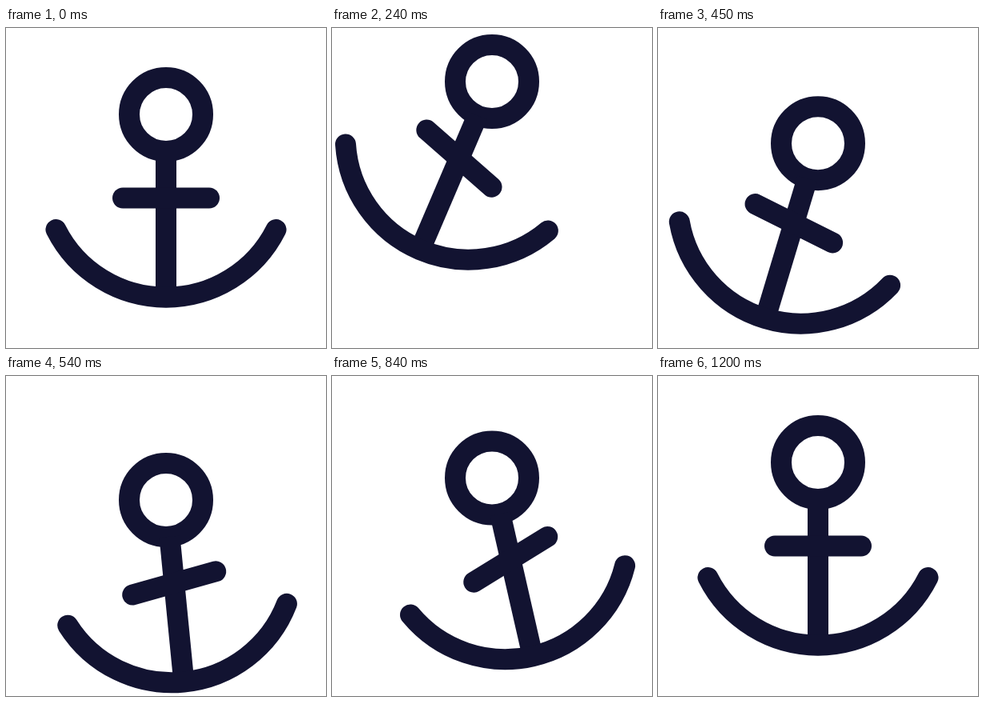
Write an HTML page that moves like this. It is 400 px wide and 400 px high and loops after 3770 ms.

```html
<!DOCTYPE html>
<html lang="en">
<head>
<meta charset="utf-8">
<title>Swinging anchor</title>
<style>
  html, body { margin: 0; height: 100%; overflow: hidden; background: #fff; }
  svg { display: block; width: 100%; height: 100%; }
</style>
</head>
<body>
<svg viewBox="0 0 400 400" fill="none" stroke="#121331" stroke-width="26">
  <g id="anchor">
    <circle r="46"/>
    <g id="shank">
      <path d="M0 46V229"/>
      <path d="M-137.5 144A154 154 0 0 0 137.5 144" stroke-linecap="round"/>
      <path id="bar" d="M-54 0H54" stroke-linecap="round"/>
    </g>
  </g>
</svg>
<script>
const LOOP = 3770, STEP = 30, END = 1200;
const $ = id => document.getElementById(id);

// Rises from 0 to 1 between two times along cubic-bezier(a, 0, b, 1)
function ramp(t, from, to, a = .67, b = .33) {
  const x = (t - from) / (to - from);
  let lo = 0, hi = 1;
  for (let i = 0; i < 24; i++) {
    const s = (lo + hi) / 2, r = 1 - s;
    if (3 * s * r * r * a + 3 * s * s * r * b + s ** 3 < x) lo = s; else hi = s;
  }
  return lo * lo * (3 - 2 * lo);
}

// Hop up, drop below the resting height, settle
const lift = t =>
  -44.5 * ramp(t, 0, 154, .33) + 92.5 * ramp(t, 154, 590) - 48 * ramp(t, 590, END, .38, .26);

// Swing left, right, slightly left again, settle
const swing = t =>
  24.3 * ramp(t, 0, 300, .6, .4) - 42 * ramp(t, 300, 715)
  + 20.4 * ramp(t, 715, 1030) - 2.7 * ramp(t, 1030, END);

// The crossbar adds its own tilt
const tilt = t =>
  18.4 * ramp(t, 0, 278) - 38.4 * ramp(t, 278, 720) + 20 * ramp(t, 720, END, .67, .46);

function draw(ms) {
  const t = Math.floor(ms % LOOP / STEP) * STEP;
  $("anchor").setAttribute("transform", `translate(200 ${108 + lift(t)})`);
  $("shank").setAttribute("transform", `rotate(${swing(t)})`);
  $("bar").setAttribute("transform", `translate(0 104.5) rotate(${tilt(t)})`);
}

const start = performance.now();
function tick() {
  draw(performance.now() - start);
  requestAnimationFrame(tick);
}
tick();
</script>
</body>
</html>
```
